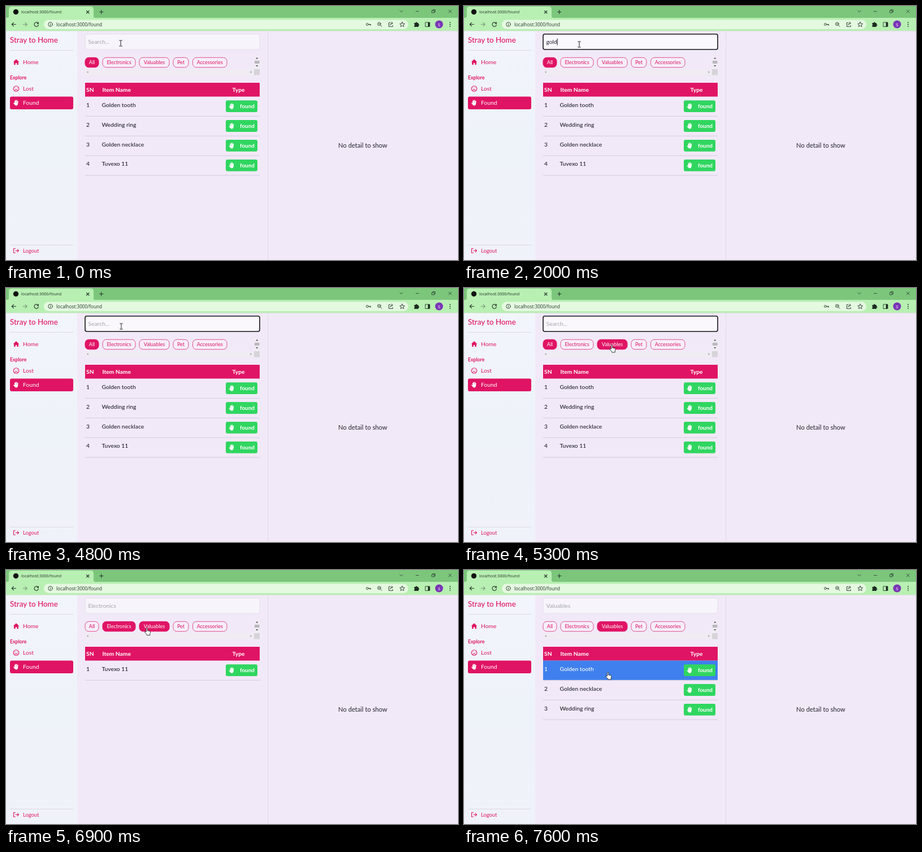
An HTML page that plays this animation: 800x450 px, repeating every 8 s.

```html
<!DOCTYPE html>
<html lang="en">
<head>
<meta charset="utf-8">
<title>Found items</title>
<style>
  html, body { margin: 0; width: 100%; height: 100%; overflow: hidden; background: #f2e9f8; }
  svg { display: block; width: 800px; height: 450px; }
  text { font: 10.3px Lato, "Open Sans", sans-serif; fill: #24222e; white-space: pre; }
  .chrome text { font-family: "Open Sans", "Noto Sans", sans-serif; fill: #24352a; }
  .pink { fill: #e01464; }
  .white { fill: #fff; }
  .bold { font-weight: 700; }
  .line { fill: none; stroke: #24352a; stroke-width: 1.1; stroke-linecap: round; stroke-linejoin: round; }
  .pinkline { fill: none; stroke: #e01464; stroke-width: 1.1; stroke-linecap: round; stroke-linejoin: round; }
  .rule { stroke: #dcd8e4; stroke-width: 1; }
  .chip rect { fill: #f6eefa; stroke: #e0508c; stroke-width: 1; }
  .chip text { font-size: 9px; fill: #e01464; text-anchor: middle; }
  .chip.on rect { fill: #e01464; stroke: #e01464; }
  .chip.on text { fill: #fff; }
  #box { fill: #f7f5fb; stroke: #e2dde8; stroke-width: 1; }
  #box.focus { fill: #faf8fd; stroke: #15131a; stroke-width: 1.6; }
  #query.empty { fill: #a5a3ae; }
  .row text { font-weight: 500; }
  .row .bg { fill: none; }
  .row.hover .bg { fill: #3f80ee; }
  .row.hover text, .row .tag { fill: #fff; }
  .row .tag { font-weight: 700; font-size: 9.9px; }
</style>
</head>
<body>
<svg viewBox="0 0 800 450" xmlns="http://www.w3.org/2000/svg">
  <defs>
    <g id="palm" fill="#fff" stroke="#fff" stroke-width="1.45" stroke-linecap="round">
      <path d="M-2.4-3 -1.7 1M-.7-4.6V0M1.1-4.4V0M2.9-2.9 2.5 1M-4.1.6-2 3" fill="none"/>
      <path d="M-2 .5H2.5V2.5Q2.2 4.6.6 4.6H-.2Q-1.5 4.5-2.4 3Z" stroke-width="1"/>
    </g>
    <linearGradient id="side" x2="0" y2="1">
      <stop stop-color="#f2f5fb"/><stop offset=".5" stop-color="#eef3f9"/><stop offset="1" stop-color="#f0f2f9"/>
    </linearGradient>
  </defs>

  <g class="chrome">
    <path d="M0 0H800V22H0Z" fill="#7cc67c"/>
    <path d="M0 21H2Q5 21 5 18V6Q5 1 10 1H150Q155 1 155 6V18Q155 21 158 21H800V44H0Z" fill="#b8efb2"/>
    <circle cx="17.500" cy="10.500" r="4.700" fill="#111"/>
    <text x="27" y="13.300" style="font-size:7.2px">localhost:3000/found</text>
    <path class="line" d="M142.500 8.500l4.500 4.500m0-4.500l-4.500 4.500M165.500 10.500h6.500m-3.250-3.250v6.500"/>
    <path class="line" style="stroke-width:.8" d="M697 8l2.700 2.700L702.400 8M725.500 9.500h5M754 8h4v4h-4zM755.500 8V6.500h4v4H758M783.500 7l5 5m0-5l-5 5"/>
    <path class="line" d="M17.500 32.500H10.500m3-3.200-3.200 3.200 3.200 3.200"/>
    <path class="line" style="stroke:#7a9c7c" d="M30 32.500h7m-3-3.200 3.200 3.200-3.200 3.200"/>
    <path class="line" d="M56.800 30.500a3.700 3.700 0 1 0 .6 2.800M57.400 28.800v2.300h-2.300"/>
    <rect x="67" y="24.500" width="645" height="16.500" rx="8.250" fill="#e4f9e0"/>
    <g class="line" style="stroke-width:.9">
      <circle cx="78.500" cy="32.500" r="3.700"/>
      <path d="M78.500 32.300v2M78.500 30.700v.1"/>
      <circle cx="639.500" cy="32.500" r="1.900"/>
      <path d="M641.500 32.500h4v1.700M643.800 32.500v1.500"/>
      <circle cx="660.500" cy="31.800" r="2.800"/>
      <path d="M659.300 31.800h2.400M662.700 34l2.400 2.400"/>
      <path d="M680 29.500h-2.500v7h7v-2M679.500 34q.4-3.400 4-3.600M682 28.500l2.500 1.900-2.500 2"/>
      <path d="M701.300 28.300l1.300 2.900 3.100.3-2.400 2 .8 3.100-2.800-1.700-2.800 1.700.8-3.100-2.400-2 3.100-.3z"/>
      <rect x="742.500" y="29" width="7.500" height="7.500"/>
    </g>
    <text x="89" y="35.600" style="font-size:8.2px">localhost:3000/found</text>
    <path d="M722.500 30H725a1.400 1.400 0 0 1 2.800 0H730v2.300a1.400 1.400 0 0 1 0 2.800V37H722.500V34.800a1.400 1.400 0 0 0 0-2.600ZM746.800 29H750v7.500H746.800Z" fill="#1c2a20"/>
    <circle cx="766.500" cy="32.500" r="7" fill="#7a35b5"/>
    <text x="766.500" y="35.500" text-anchor="middle" style="font-size:8px;fill:#fff">S</text>
    <g fill="#24352a"><circle cx="786" cy="29.300" r=".95"/><circle cx="786" cy="32.700" r=".95"/><circle cx="786" cy="36.100" r=".95"/></g>
  </g>

  <path d="M0 44H800V450H0Z" fill="#f2e9f8"/>
  <path d="M0 44H126V450H0Z" fill="url(#side)"/>
  <path d="M0 44.300H800" stroke="#d4dfd8" stroke-width=".7"/>
  <path class="rule" d="M463.500 45V450M7 78.500H119M7 423.500H119"/>
  <text class="pink" x="7" y="65" style="font-size:13.4px;font-weight:500">Stray to Home</text>
  <path class="pink" d="M18 94.200 23.300 99.300H21.900V104H19.300V100.900H16.700V104H14.100V99.300H12.700Z"/>
  <text class="pink" x="30" y="103">Home</text>
  <text class="pink bold" x="7" y="129.500" style="font-size:8.7px">Explore</text>
  <g class="pinkline">
    <circle cx="18" cy="146.500" r="4.800"/>
    <path d="M16.200 145v.3M19.800 145v.3M15.800 149.200q2.200-2.300 4.400 0"/>
    <path d="M16.500 429.700h-3v7.600h3M17 433.500h5.300m-2.200-2.300 2.300 2.300-2.300 2.300"/>
  </g>
  <text class="pink" x="30" y="150">Lost</text>
  <rect class="pink" x="7" y="160.500" width="112" height="22.500" rx="3"/>
  <use href="#palm" x="18" y="171.500"/>
  <text class="white" x="30" y="175">Found</text>
  <text class="pink" x="30" y="437" style="font-size:9.3px">Logout</text>
  <text x="631.500" y="251.300" text-anchor="middle" style="font-size:11.2px">No detail to show</text>

  <rect id="box" x="140" y="49.700" width="309" height="27.300" rx="3"/>
  <text id="query" x="145.500" y="67"></text>
  <path id="caret" d="M0 57.500V69.500" stroke="#15131a" stroke-width=".9"/>

  <g id="chips"></g>
  <path d="M140 112H439V122.500H140ZM439 91H449V112H439Z" fill="#f1ebf4"/>
  <path d="M439 112H449V122.500H439Z" fill="#d6d3d9"/>
  <path d="M440 97H448.500V102H440Z" fill="#b9b7bc"/>
  <path d="M442 93.500 444.200 91 446.400 93.500ZM442 105 444.200 107.500 446.400 105Z" fill="#55525a"/>
  <path d="M145.500 115.300V118.900L143 117.100ZM432.500 115.300V118.900L435 117.100Z" fill="#98959d"/>

  <path class="pink" d="M140 136H449V160.500H140Z"/>
  <g><text class="white bold" x="142" y="152">SN</text><text class="white bold" x="170.500" y="152">Item Name</text><text class="white bold" x="400.500" y="152">Type</text></g>
  <g id="rows"></g>

  <g id="cursor" stroke-linejoin="round">
    <path data-kind="beam" d="M-2.700-5H-.7L0-4.500.7-5H2.700M0-4.500V4.500M-2.700 5H-.7L0 4.500.7 5H2.700" fill="none" stroke="#1b1a20" stroke-width="1"/>
    <path data-kind="arrow" d="M0 0V11L2.600 8.700 4.300 12.400 6 11.600 4.400 8.100H7.800Z" fill="#fff" stroke="#222" stroke-width=".8"/>
    <path data-kind="hand" d="M-1.300 7V1.200a1.100 1.100 0 0 1 2.200 0V5l4 .8q1.300.4 1.200 1.800L5.200 11v2H-.2v-1.200L-3.700 8.200q-.8-1.500.6-1.700Z" fill="#fff" stroke="#222" stroke-width=".9"/>
  </g>
</svg>

<script>
const LOOP = 8000, STEP = 100, ROW_TOP = 160.5, ROW_H = 34.9;
const $ = id => document.getElementById(id);

const items = {
  tooth: 'Golden tooth', ring: 'Wedding ring',
  necklace: 'Golden necklace', phone: 'Tuvexo 11'
};
const every = ['tooth', 'ring', 'necklace', 'phone'];
const gold = ['tooth', 'necklace', 'ring'];
const gadgets = ['phone'];

// Each track lists [start time, value...]; a value holds until the next entry.
const typed = [[0, ''], [1500, 'g'], [1700, 'go'], [1800, 'gol'], [2000, 'gold'],
  [2100, 'golde'], [2300, 'golden'], [3700, 'golde'], [3800, 'gold'], [3900, 'gol'],
  [4000, 'go'], [4100, 'g'], [4300, '']];
const caretOn = [[0, 0], [700, 1], [1000, 0], [1200, 1], [2500, 0], [2700, 1], [3100, 0],
  [3300, 1], [3600, 0], [3700, 1], [4700, 0], [5000, 1], [5200, 0]];
const focus = [[0, false], [700, true], [5400, false]];
const category = [[0, 'All'], [5400, 'Valuables'], [6200, 'Electronics'], [7000, 'Valuables']];
const results = [[0, every], [2700, gold], [4700, every], [5400, gold], [6200, gadgets], [7000, gold]];
const pointer = [[0, 203, 66], [100, 204, 67], [200, 204, 68], [4900, 206, 71], [5000, 212, 78],
  [5100, 225, 86], [5200, 246, 96], [5300, 262, 101], [5500, 266, 101.5], [5700, 222, 102],
  [6000, 224, 102], [6500, 226, 106], [6700, 232, 105], [6800, 243, 103], [6900, 249.5, 102.5],
  [7300, 250, 113], [7400, 251, 137], [7500, 254, 168], [7600, 255, 181]];

const at = (track, t) => track.findLast(k => k[0] <= t).slice(1);

const chips = [['All', 140, 164], ['Electronics', 171, 229], ['Valuables', 236, 289],
  ['Pet', 296, 323], ['Accessories', 330.5, 391]];
$('chips').innerHTML = chips.map(([name, l, r]) => `<g class="chip">
  <rect x="${l}" y="91.300" width="${r - l}" height="17.400" rx="6.500"/>
  <text x="${(l + r) / 2}" y="103.200">${name}</text></g>`).join('');

$('rows').innerHTML = every.map((_, i) => `<g class="row" transform="translate(0 ${ROW_TOP + i * ROW_H})">
  <path class="bg" d="M140 0H449V34.500H140Z"/>
  <path class="rule" d="M140 34.800H449" style="stroke:#d2ccda"/>
  <text x="142" y="18.300">${i + 1}</text><text class="name" x="169.500" y="18.300"></text>
  <rect x="389" y="6.700" width="56" height="20.800" rx="3" fill="#30d660"/>
  <use href="#palm" x="399.500" y="17.200"/>
  <text class="tag" x="414" y="20.700">found</text></g>`).join('');

const chipEls = [...$('chips').children];
const rowEls = [...$('rows').children];
const cursorEls = [...$('cursor').children];

function render(t) {
  const [text] = at(typed, t), [focused] = at(focus, t), [chosen] = at(category, t);
  const [list] = at(results, t), [x, y] = at(pointer, t);

  $('box').classList.toggle('focus', focused);
  const query = $('query');
  query.textContent = text || (chosen === 'All' ? 'Search...' : chosen);
  query.classList.toggle('empty', !text);
  const end = 146 + (text ? query.getComputedTextLength() : 0);
  $('caret').setAttribute('transform', `translate(${end} 0)`);
  $('caret').style.display = at(caretOn, t)[0] ? '' : 'none';

  let clickable = false;
  chips.forEach(([name, l, r], i) => {
    const over = x >= l && x <= r && y > 91 && y < 109;
    clickable ||= over;
    chipEls[i].classList.toggle('on', over || name === chosen);
  });
  rowEls.forEach((el, i) => {
    const shown = i < list.length;
    const over = shown && Math.floor((y - ROW_TOP) / ROW_H) === i;
    clickable ||= over;
    el.style.display = shown ? '' : 'none';
    el.classList.toggle('hover', over);
    if (shown) el.querySelector('.name').textContent = items[list[i]];
  });

  const kind = y < 77 ? 'beam' : clickable ? 'hand' : 'arrow';
  cursorEls.forEach(el => el.style.display = el.dataset.kind === kind ? '' : 'none');
  $('cursor').setAttribute('transform', `translate(${x} ${y})`);
}

function tick() {
  const t = performance.now() % LOOP;
  render(Math.floor(t / STEP) * STEP);
  requestAnimationFrame(tick);
}
tick();
</script>
</body>
</html>
```
